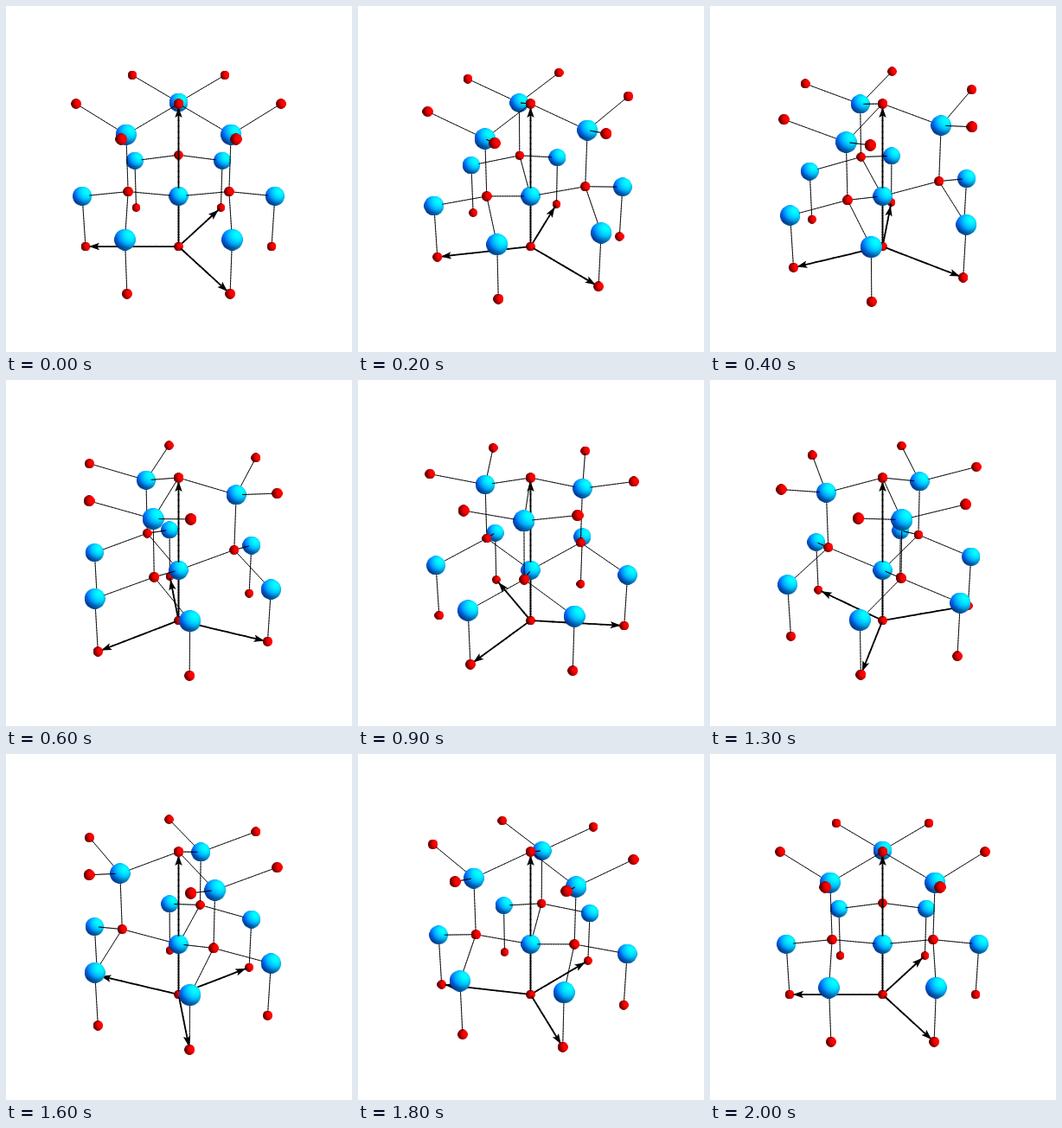
An HTML page with a canvas for the animation above (2100 ms loop, 400x400 px).

```html
<!DOCTYPE html>
<html lang="en">
<head>
<meta charset="utf-8">
<title>Rotating crystal lattice</title>
<style>
html, body { margin: 0; width: 100%; height: 100%; overflow: hidden; background: #fff; }
canvas { display: block; }
</style>
</head>
<body>
<canvas id="stage" width="400" height="400"></canvas>
<script>
const ctx = document.getElementById('stage').getContext('2d');
const RAD = Math.PI / 180;
const HEIGHT = Math.sqrt(8 / 3);           // ideal c/a ratio of the hexagonal cell
const SIN = 1 / Math.sqrt(5), COS = 2 * SIN; // camera elevation
const FOCAL = 852, DISTANCE = 7.558, CENTER = 199.5;
const STEP = 100, STEPS = 21, TURN = 6;

const atoms = [], bonds = [], arrows = [];

function atom(radius, angle, level, blue) {
  const a = { radius, angle, h: (level - 0.5) * HEIGHT, size: blue ? 0.1 : 0.05, blue };
  atoms.push(a);
  return a;
}
const bond = (a, b) => bonds.push([a, b]);

// Hexagonal layers with a centre atom
const hexLayer = (level, blue) => ({
  mid: atom(0, 0, level, blue),
  ring: Array.from({ length: 6 }, (_, i) => atom(1, i * 60, level, blue))
});
const baseLayer = hexLayer(0, false);
const blueLayer = hexLayer(3 / 8, true);
const topLayer = hexLayer(1, false);

baseLayer.ring.forEach((a, i) => {
  bond(a, blueLayer.ring[i]);
  if (i % 2) arrows.push([baseLayer.mid, a]);
});
for (let i = 0; i < 6; i += 2) {
  const angle = 30 + i * 60;
  const red = atom(1 / Math.sqrt(3), angle, 1 / 2, false);
  const blue = atom(1 / Math.sqrt(3), angle, 7 / 8, true);
  bond(red, blue);
  for (const [layer, end] of [[blueLayer, red], [topLayer, blue]]) {
    for (const a of [layer.mid, layer.ring[i], layer.ring[i + 1]]) bond(a, end);
  }
}
arrows.push([blueLayer.mid, topLayer.mid]);

// Sphere shaded by three directional lights
function sphere(shade) {
  const n = 64, c = document.createElement('canvas');
  c.width = c.height = n;
  const g = c.getContext('2d'), img = g.createImageData(n, n);
  for (let i = 0; i < n * n; i++) {
    const x = (i % n + 0.5) / n * 2 - 1;
    const y = 1 - (Math.floor(i / n) + 0.5) / n * 2;
    const zz = 1 - x * x - y * y;
    if (zz < 0) continue;
    const z = Math.sqrt(zz);
    const right = Math.max(0, (3 * x - y + 3 * z) / Math.sqrt(19));
    const corner = Math.max(0, (x + y + z) / Math.sqrt(3));
    const above = Math.max(0, (-x + 3 * y + 3 * z) / Math.sqrt(19));
    img.data.set([...shade(right, corner, above).map(v => v * 255), 255], i * 4);
  }
  g.putImageData(img, 0, 0);
  return c;
}
const redBall = sphere((r, c, a) => [0.35 + 0.5 * r + 0.3 * c + 0.1 * a, 0, 0]);
const blueBall = sphere((r, c, a) => [
  0, 0.2 + 0.25 * r + 0.45 * c + 0.25 * a, 0.52 + 0.2 * r + 0.3 * c + 0.5 * a
]);

function project([x, h, z]) {
  const depth = z * COS + h * SIN;
  const scale = FOCAL / (DISTANCE - depth);
  return { x: CENTER + scale * x, y: CENTER - scale * (h * COS - z * SIN), scale, depth };
}

const mix = (p, q, t) => p.map((v, i) => v + (q[i] - v) * t);

function drawBall(a, p) {
  const r = a.size * p.scale;
  ctx.drawImage(a.blue ? blueBall : redBall, p.x - r, p.y - r, 2 * r, 2 * r);
}

function drawLine(p, q, width) {
  ctx.lineWidth = width;
  ctx.beginPath();
  ctx.moveTo(p.x, p.y);
  ctx.lineTo(q.x, q.y);
  ctx.stroke();
}

function drawHead(from, to) {
  ctx.save();
  ctx.translate(to.x, to.y);
  ctx.rotate(Math.atan2(to.y - from.y, to.x - from.x));
  ctx.beginPath();
  ctx.moveTo(-4, 0);
  ctx.lineTo(-16, -4.2);
  ctx.lineTo(-13.5, 0);
  ctx.lineTo(-16, 4.2);
  ctx.fill();
  ctx.restore();
}

function draw(step) {
  const items = [];
  const add = (depth, paint) => items.push({ depth, paint });

  for (const a of atoms) {
    const t = (a.angle - step * TURN) * RAD;
    a.pos = [a.radius * Math.cos(t), a.h, a.radius * Math.sin(t)];
    const p = project(a.pos);
    add(p.depth, () => drawBall(a, p));
  }

  // Short pieces, trimmed to the ball surfaces, sort correctly by depth
  function addLine(a, b, width, pieces = 14) {
    const length = Math.hypot(...a.pos.map((v, i) => v - b.pos[i]));
    const start = a.size / length, span = 1 - start - b.size / length;
    const at = i => project(mix(a.pos, b.pos, start + span * i / pieces));
    for (let i = 0; i < pieces; i++) {
      const p = at(i), q = at(i + 1);
      add((p.depth + q.depth) / 2, () => drawLine(p, q, width));
    }
  }
  for (const [a, b] of bonds) addLine(a, b, 0.9);
  addLine(baseLayer.mid, blueLayer.mid, 1.8);
  for (const [a, b] of arrows) {
    addLine(a, b, 1.8);
    const from = project(a.pos), to = project(b.pos);
    add(project(mix(a.pos, b.pos, 0.95)).depth, () => drawHead(from, to));
  }

  ctx.fillStyle = '#fff';
  ctx.fillRect(0, 0, 400, 400);
  ctx.fillStyle = ctx.strokeStyle = '#000';
  ctx.lineCap = 'round';
  items.sort((a, b) => a.depth - b.depth).forEach(item => item.paint());
}

ctx.imageSmoothingQuality = 'high';
const startTime = performance.now();
function tick() {
  draw(Math.floor((performance.now() - startTime) / STEP) % STEPS);
  requestAnimationFrame(tick);
}
tick();
</script>
</body>
</html>
```
